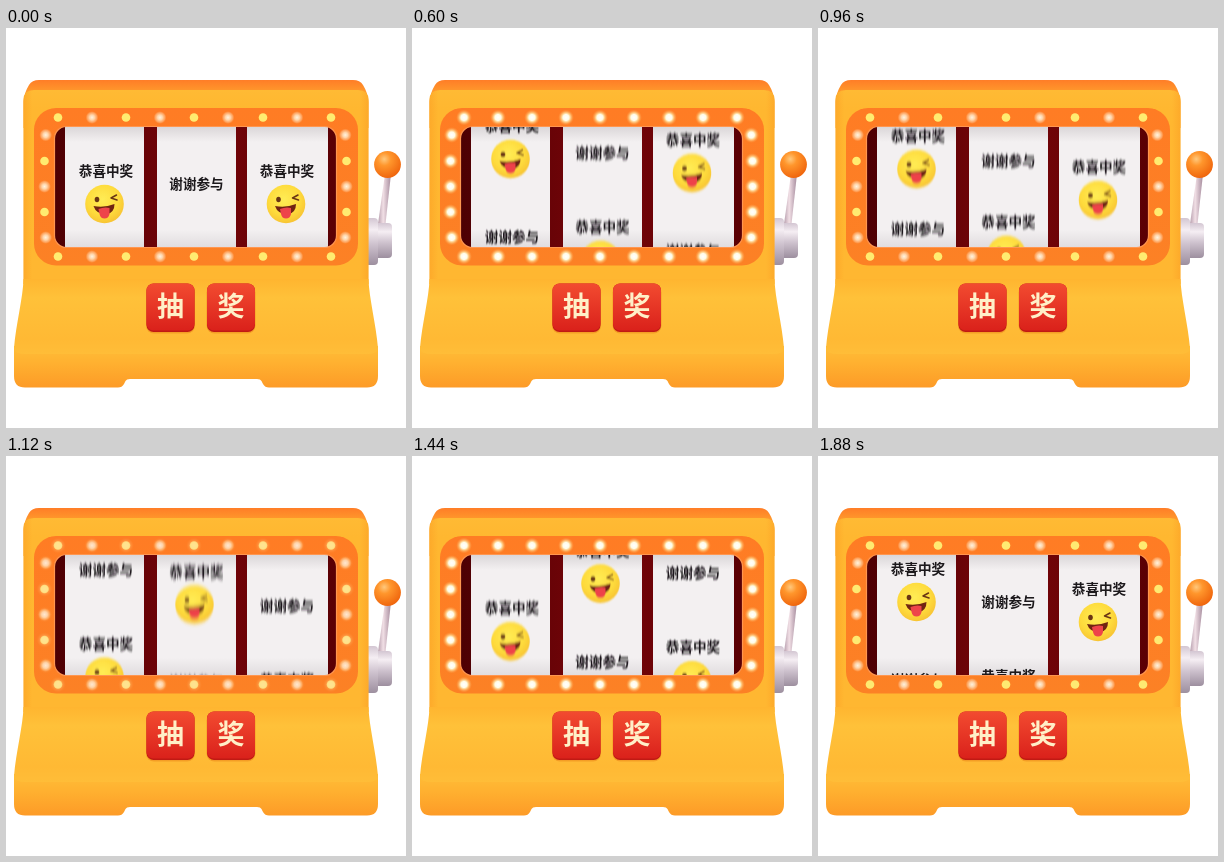
Write an HTML page that moves like this. It is 400 by 400 pixels and loops after 1.92 s.

```html
<!DOCTYPE html>
<html lang="zh-CN">
<head>
<meta charset="utf-8">
<title>抽奖机</title>
<style>
html, body { margin: 0; width: 100%; height: 100%; overflow: hidden; background: #fff; }
svg { display: block; width: 100vw; height: 100vh; }
text { font-family: "Noto Sans CJK SC", "Noto Sans CJK", "Noto Sans", sans-serif; font-weight: 700; text-anchor: middle; }
.label { font-size: 13.6px; fill: #1c191c; }
.key { font-size: 27px; fill: #fff0c8; }
</style>
</head>
<body>
<svg viewBox="0 0 400 400" xmlns="http://www.w3.org/2000/svg">
  <defs>
    <linearGradient id="back" x2="0" y2="1"><stop stop-color="#ff7d27"/><stop offset=".25" stop-color="#ff9a2c"/><stop offset="1" stop-color="#ffa42d"/></linearGradient>
    <linearGradient id="face" x2="0" y2="1"><stop stop-color="#ffba34"/><stop offset=".1" stop-color="#ffb730"/><stop offset="1" stop-color="#ffb731"/></linearGradient>
    <linearGradient id="shelf" x2="0" y2="1"><stop stop-color="#ffb530"/><stop offset=".25" stop-color="#ffc139"/><stop offset=".8" stop-color="#ffb934"/><stop offset="1" stop-color="#ffbd38"/></linearGradient>
    <linearGradient id="lip" x2="0" y2="1"><stop stop-color="#ffbd38"/><stop offset=".4" stop-color="#ffb130"/><stop offset="1" stop-color="#fd9b27"/></linearGradient>
    <linearGradient id="sides"><stop stop-color="#fb9620" stop-opacity=".4"/><stop offset=".025" stop-color="#fb9620" stop-opacity="0"/><stop offset=".975" stop-color="#fb9620" stop-opacity="0"/><stop offset="1" stop-color="#fb9620" stop-opacity=".4"/></linearGradient>
    <linearGradient id="panel" x2="0" y2="1"><stop stop-color="#ff7c24"/><stop offset="1" stop-color="#fc8125"/></linearGradient>
    <linearGradient id="hole"><stop stop-color="#4d0003"/><stop offset=".5" stop-color="#780509"/><stop offset="1" stop-color="#5a0004"/></linearGradient>
    <linearGradient id="paper" x2="0" y2="1"><stop stop-color="#d9d5d7"/><stop offset=".13" stop-color="#f3f0f1"/><stop offset=".85" stop-color="#f3f0f1"/><stop offset="1" stop-color="#e0dcde"/></linearGradient>
    <linearGradient id="red" x2="0" y2="1"><stop stop-color="#f24b30"/><stop offset="1" stop-color="#da211b"/></linearGradient>
    <linearGradient id="metal" x2="0" y2="1"><stop stop-color="#d3c6d2"/><stop offset=".25" stop-color="#f5eef3"/><stop offset=".55" stop-color="#cfc3cf"/><stop offset="1" stop-color="#9d8f9f"/></linearGradient>
    <linearGradient id="rod"><stop stop-color="#b79fae"/><stop offset=".4" stop-color="#f1dfe5"/><stop offset="1" stop-color="#a58b9d"/></linearGradient>
    <radialGradient id="knob" cx=".38" cy=".3" r=".7"><stop stop-color="#ffc87c"/><stop offset=".35" stop-color="#ff962c"/><stop offset="1" stop-color="#f0670e"/></radialGradient>
    <radialGradient id="skin" cx=".45" cy=".38" r=".62"><stop stop-color="#ffec55"/><stop offset=".65" stop-color="#fedb3c"/><stop offset="1" stop-color="#f8c434"/></radialGradient>
    <radialGradient id="soft"><stop stop-color="#fff3df"/><stop offset=".4" stop-color="#ffd9b0" stop-opacity=".95"/><stop offset=".75" stop-color="#ffb478" stop-opacity=".7"/><stop offset="1" stop-color="#ff9c50" stop-opacity="0"/></radialGradient>
    <radialGradient id="glow"><stop stop-color="#fff"/><stop offset=".38" stop-color="#fffbe6"/><stop offset=".58" stop-color="#ffd58f" stop-opacity=".85"/><stop offset="1" stop-color="#ff9d45" stop-opacity="0"/></radialGradient>
    <clipPath id="window"><rect x="48.500" y="98.500" width="282" height="121" rx="12"/></clipPath>
    <g id="emoji">
      <circle r="19.300" fill="url(#skin)"/>
      <ellipse cx="-7.500" cy="-4.500" rx="2.300" ry="2.800" fill="#6a3514"/>
      <path d="M12-9L6.500-6L12.500-4" fill="none" stroke="#6a3514" stroke-width="1.500" stroke-linecap="round" stroke-linejoin="round"/>
      <path d="M-11 2Q0 4 10 0Q10 8 3 10Q-8 11-11 2Z" fill="#702412"/>
      <path d="M-6 5Q0 2.500 5 4L5 10Q4 14.500 0 14.500Q-4 14.500-5 10Z" fill="#ee434a"/>
    </g>
  </defs>

  <g id="lever">
    <path d="M379 146H385L379.500 196H372Z" fill="url(#rod)"/>
    <circle cx="381.500" cy="136.500" r="13.400" fill="url(#knob)"/>
    <rect x="368" y="195" width="18" height="35" rx="4" fill="url(#metal)"/>
    <rect x="359" y="190" width="13" height="47" rx="4" fill="url(#metal)"/>
  </g>

  <path d="M17.500 74Q18 65 23 57Q26 52 33 52H347Q354 52 357 57Q362 65 362.500 74V100H17.500Z" fill="url(#back)"/>
  <g id="front">
    <path id="plate" d="M17.500 72Q17.500 62 28 62H352Q362.500 62 362.500 72V256H17.500Z" fill="url(#face)"/>
    <use href="#plate" fill="url(#sides)"/>
  </g>
  <path d="M8 318V348Q8 359.500 19 359.500H112Q116 359.500 118 356L119.500 353Q120.500 351 124 351H251Q254.500 351 255.500 353L257 356Q259 359.500 263 359.500H361Q372 359.500 372 348V318Z" fill="url(#lip)"/>
  <path d="M17.500 251H362.500C363 270 370 296 372 320Q372 326 360 326H20Q8 326 8 320C10 296 17 270 17.500 251Z" fill="url(#shelf)"/>
  <rect x="28" y="80" width="324" height="157.500" rx="22" fill="url(#panel)"/>
  <g id="lamps"></g>

  <g clip-path="url(#window)">
    <rect x="48" y="98" width="283" height="122" fill="url(#hole)"/>
    <g id="reels"></g>
  </g>
  <rect x="48.500" y="98.500" width="282" height="121" rx="12" fill="none" stroke="#ff9650" stroke-width="1.200"/>
  <g id="keys"></g>
</svg>
<script>
const LOOP = 1920, STEP = 40;
const WIN_TO_THANKS = 111, THANKS_TO_WIN = 74, EMOJI_DROP = 33;
const times = [0, 320, 600, 960, 1280, 1600, 1880];
// travel: distance rolled at each time; joint: overlap where the second strip starts
const reels = [
  { x: 59, w: 79, text: 100, emoji: 98.5, y: 143, win: true, joint: 18, travel: [0, 44, 140, 317, 474, 611, 692] },
  { x: 151, w: 79, text: 190.5, emoji: 188.5, y: 156, win: false, joint: 13, travel: [0, 51, 154, 334, 518, 652, 717] },
  { x: 241, w: 81, text: 281, emoji: 280, y: 143, win: true, joint: 18, travel: [0, 51, 154, 348, 513, 647, 712] }
];
const byId = id => document.getElementById(id);

function add(parent, tag, attrs, text) {
  const el = document.createElementNS("http://www.w3.org/2000/svg", tag);
  for (const k in attrs) el.setAttribute(k, attrs[k]);
  if (text) el.textContent = text;
  return parent.appendChild(el);
}

function buildReel(reel, i) {
  const filter = add(document.querySelector("defs"), "filter",
    { id: "blur" + i, filterUnits: "userSpaceOnUse", x: reel.x - 5, y: 70, width: reel.w + 10, height: 180 });
  reel.blur = add(filter, "feGaussianBlur", { stdDeviation: "0 0" });
  const root = byId("reels");
  add(root, "rect", { x: reel.x, y: 98, width: reel.w, height: 122, fill: "url(#paper)" });
  reel.strip = add(add(root, "g", { filter: `url(#blur${i})` }), "g", {});
  let y = reel.y, win = reel.win;
  for (let n = 0; n < 10; n++) {
    if (n === 4) y += reel.joint;
    add(reel.strip, "text", { class: "label", x: reel.text, y: y + 5 }, win ? "恭喜中奖" : "谢谢参与");
    if (win) add(reel.strip, "use", { href: "#emoji", x: reel.emoji, y: y + EMOJI_DROP });
    win = !win;
    y -= win ? WIN_TO_THANKS : THANKS_TO_WIN;
  }
}

function lampSpots() {
  const xs = [52, 86, 120, 154, 188, 222, 257, 291, 325];
  const ys = [107, 133, 158.5, 184, 209.5];
  const inset = i => (i % 4 ? 0 : 1.2);
  return [
    ...xs.map((x, i) => [x, 89.5, i % 2]),
    ...xs.map((x, i) => [x, 228.5, i % 2]),
    ...ys.map((y, i) => [38.5 + inset(i), y, (i + 1) % 2]),
    ...ys.map((y, i) => [340.5 - inset(i), y, (i + 1) % 2])
  ];
}

reels.forEach(buildReel);
// the plate is reused for its edge shading, so its own fill sits on the group copy
byId("front").lastElementChild.replaceWith(Object.assign(byId("plate").cloneNode(), { id: "" }));
byId("front").lastElementChild.setAttribute("fill", "url(#sides)");

const dim = add(byId("lamps"), "g", {}), lit = add(byId("lamps"), "g", {});
for (const [cx, cy, hazy] of lampSpots()) {
  add(dim, "circle", { cx, cy, r: hazy ? 6.5 : 4.3, fill: hazy ? "url(#soft)" : "#ffec70" });
  add(lit, "circle", { cx, cy, r: 8, fill: "url(#glow)" });
}
[["抽", 140.5], ["奖", 201]].forEach(([char, x]) => {
  const keys = byId("keys");
  add(keys, "rect", { x: x - .5, y: 256.5, width: 49, height: 49, rx: 8, fill: "#e98217", opacity: .5 });
  add(keys, "rect", { x, y: 255.5, width: 48, height: 48.5, rx: 7, fill: "#c01a13" });
  add(keys, "rect", { x, y: 255.5, width: 48, height: 47, rx: 7, fill: "url(#red)" });
  add(keys, "text", { class: "key", x: x + 24, y: 287.7 }, char);
});

function slope(v, i) {
  if (i === 0) return 0;
  if (i === v.length - 1) return .16;
  return (v[i + 1] - v[i - 1]) / (times[i + 1] - times[i - 1]);
}

// Hermite curve through the travel points
function travelAt(v, t) {
  let i = 0;
  while (i < times.length - 2 && t >= times[i + 1]) i++;
  const d = times[i + 1] - times[i], u = (t - times[i]) / d, w = 1 - u;
  return v[i] * w * w * (1 + 2 * u) + v[i + 1] * u * u * (3 - 2 * u)
    + d * u * w * (slope(v, i) * w - slope(v, i + 1) * u);
}

function render(t) {
  for (const reel of reels) {
    const pos = travelAt(reel.travel, t);
    const speed = travelAt(reel.travel, t + 1) - pos;
    reel.strip.setAttribute("transform", `translate(0 ${pos.toFixed(2)})`);
    reel.blur.setAttribute("stdDeviation", `0 ${Math.max(0.01, speed * 4 - .4).toFixed(2)}`);
  }
  const wave = .5 - .5 * Math.cos(t / 960 * 2 * Math.PI);
  const level = Math.min(1, wave * 1.25);
  lit.setAttribute("opacity", level);
  dim.setAttribute("opacity", 1 - level * .6);
}

const start = performance.now();
function tick() {
  const t = (performance.now() - start) % LOOP;
  render(Math.floor(t / STEP) * STEP);
  requestAnimationFrame(tick);
}
tick();
</script>
</body>
</html>
```
